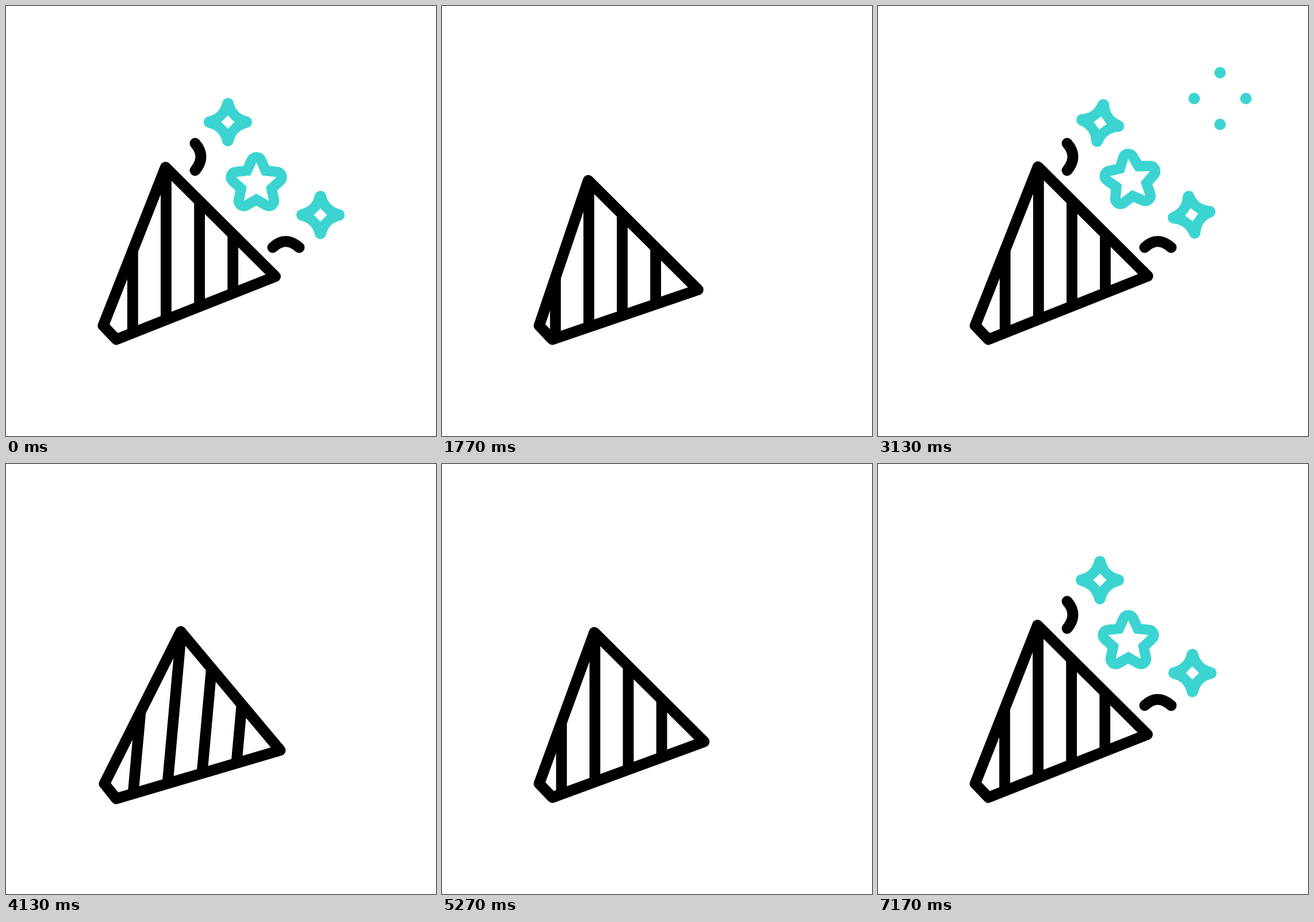
Animation of 748 by 748 pixels, one loop 7200 ms. Source, as an HTML page with a canvas:

```html
<!DOCTYPE html>
<html lang="en">
<head>
<meta charset="utf-8">
<title>Party popper</title>
<style>
  html, body { margin: 0; width: 100%; height: 100%; overflow: hidden; background: #fff; }
  canvas { display: block; width: 100vw; height: 100vh; }
</style>
</head>
<body>
<canvas id="stage" width="748" height="748"></canvas>
<script>
const ctx = document.getElementById('stage').getContext('2d');
const PERIOD = 3600, TEAL = '#3bd4d1', INK = '#000', PAPER = '#fff';
const PIVOT = [168, 579], MOUTH = [350, 398];
const RAD = Math.PI / 180;

const ease = {
  line: u => u,
  in: u => u * u,
  out: u => 1 - (1 - u) ** 3,
  both: u => u < .5 ? 2 * u * u : 1 - 2 * (1 - u) ** 2
};

// Each step: [time, value, easing used to reach it]
const tilt = [[0, 0], [320, 0], [735, 10, 'both'], [1090, -26, 'out'], [1465, 0, 'both']];
const squash = [[0, 0], [1465, 0], [1900, 28, 'both'], [2140, -22, 'both'], [2350, -2, 'out'], [3570, 0, 'line']];
const burst = [[0, 1], [270, 0, 'in'], [2130, 0], [2370, 1, 'out']];
const drift = [[0, 1], [2100, 1], [2101, 0], [2370, 0], [3570, 1, 'both']];
const curl = [[0, 1], [270, 0, 'in'], [2430, 0], [2750, 1, 'out']];
const dotGrow = [[0, 0], [2150, 0], [2350, 1, 'out'], [3060, 1], [3450, 0, 'in']];
const dotFly = [[0, -.9], [2150, -.9], [2370, 0, 'out'], [3020, 1, 'both']];

function at(steps, t) {
  for (let i = 1; i < steps.length; i++) {
    const [t0, v0] = steps[i - 1], [t1, v1, kind = 'line'] = steps[i];
    if (t < t1) return v0 + (v1 - v0) * ease[kind]((t - t0) / (t1 - t0));
  }
  return steps[steps.length - 1][1];
}

const mix = (a, b, u) => a + (b - a) * u;
const mixPoint = (p, q, u) => [mix(p[0], q[0], u), mix(p[1], q[1], u)];

function polygon(points) {
  const path = new Path2D();
  points.forEach(([x, y]) => path.lineTo(x, y));
  path.closePath();
  return path;
}

function stroke(path, color, width) {
  ctx.strokeStyle = color;
  ctx.lineWidth = width;
  ctx.stroke(path);
}

function fill(path, color) {
  ctx.fillStyle = color;
  ctx.fill(path);
}

function placed([x, y], scale, turn, draw) {
  if (scale < .01) return;
  ctx.save();
  ctx.translate(x, y);
  ctx.rotate(turn * RAD);
  ctx.scale(scale, scale);
  draw();
  ctx.restore();
}

const starPath = polygon(Array.from({ length: 10 }, (_, i) => {
  const r = i % 2 ? 17.5 : 37, a = i * 36 * RAD;
  return [r * Math.sin(a), -r * Math.cos(a)];
}));
const sparkPath = new Path2D('M0-32Q6-6 32 0Q6 6 0 32Q-6 6-32 0Q-6-6 0-32Z');
const sparkHole = polygon([[0, -11.5], [11.5, 0], [0, 11.5], [-11.5, 0]]);
const curls = [new Path2D('M329 239Q349 262 329 286'), new Path2D('M464 420Q486 399 510 420')];

function drawStar() {
  stroke(starPath, TEAL, 36);
  fill(starPath, PAPER);
}

function drawSpark() {
  fill(sparkPath, TEAL);
  stroke(sparkPath, TEAL, 20);
  fill(sparkHole, PAPER);
}

function drawConfetti(t) {
  const b = at(burst, t), d = at(drift, t), spin = (1 - b) * 90;
  const put = (from, to, turn, draw) =>
    placed(mixPoint(MOUTH, mixPoint(from, to, d), b), b, turn * (1 - d) + Math.sign(turn) * spin, draw);
  put([388, 207.5], [386, 202], 36, drawSpark);
  put([541.5, 362], [547, 363.5], -36, drawSpark);
  put([451.5, 286.5], [435.5, 309], -26, drawStar);

  const c = at(curl, t);
  if (c > .01) {
    ctx.save();
    ctx.translate(MOUTH[0] * (1 - c), MOUTH[1] * (1 - c));
    ctx.scale(c, c);
    curls.forEach(path => stroke(path, INK, 19));
    ctx.restore();
  }
}

function drawDots(t) {
  const r = 10.3 * at(dotGrow, t), f = at(dotFly, t);
  if (r < .1) return;
  const x = mix(541, 595, f), y = mix(208, 161, f), ring = Math.max(4, mix(21.7, 45, f));
  ctx.fillStyle = TEAL;
  for (const [dx, dy] of [[0, -1], [1, 0], [0, 1], [-1, 0]]) {
    ctx.beginPath();
    ctx.arc(x + dx * ring, y + dy * ring, r, 0, 7);
    ctx.fill();
  }
}

function drawCone(t) {
  const d = at(squash, t);
  const body = polygon([[277.5 - d, 280.5 + d], [468.5 - d, 470.5 + d], [192, 580], [169, 556]]);
  ctx.save();
  ctx.translate(...PIVOT);
  ctx.rotate(at(tilt, t) * RAD);
  ctx.translate(-PIVOT[0], -PIVOT[1]);
  fill(body, PAPER);
  ctx.save();
  ctx.clip(body);
  ctx.fillStyle = INK;
  for (let i = 0; i < 4; i++) ctx.fillRect(211 + i * 58.1 - d, 200, 18.8, 420);
  ctx.restore();
  stroke(body, INK, 19);
  ctx.restore();
}

function draw(t) {
  ctx.fillStyle = PAPER;
  ctx.fillRect(0, 0, 748, 748);
  drawDots(t);
  drawConfetti(t);
  drawCone(t);
}

ctx.lineJoin = ctx.lineCap = 'round';
const start = performance.now();
function tick() {
  draw((performance.now() - start) % PERIOD);
  requestAnimationFrame(tick);
}
draw(0);
requestAnimationFrame(tick);
</script>
</body>
</html>
```
